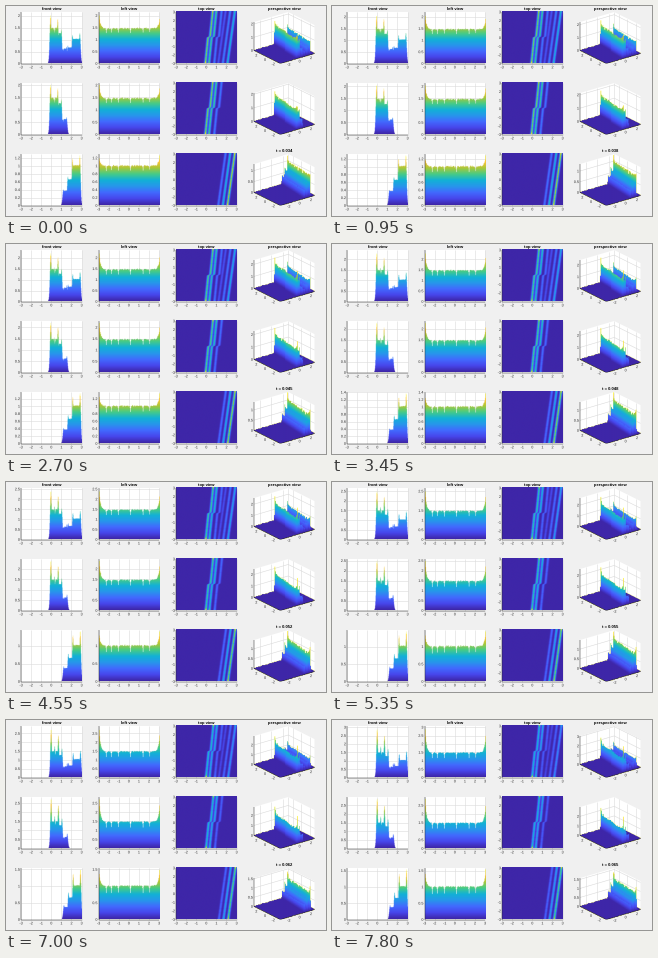
Write a matplotlib script that moves like this. It is 320 px wide and 210 px high and loops after 8 s.

```python
import numpy as np
import matplotlib.pyplot as plt
from matplotlib.animation import FuncAnimation
from matplotlib.collections import LineCollection
from matplotlib.colors import LinearSegmentedColormap
from matplotlib.patches import PathPatch, Polygon
from matplotlib.path import Path
from matplotlib.textpath import TextPath

W, H, DPI = 320, 210, 100
COLS = [15, 92.5, 170, 248]
ROWS = [6, 77, 148]
PW, PH = 60.5, 51.5
FRAMES, LAST = 160, 153
INK, GRID = "#262626", "#dadada"

parula = LinearSegmentedColormap.from_list("parula", [
    "#3e26a8", "#4746eb", "#4269fe", "#2796eb", "#12b1d6",
    "#47cb86", "#abc739", "#fec338", "#f9fb15"])

plt.rcParams["font.family"] = "Liberation Sans"
fig = plt.figure(figsize=(W / DPI, H / DPI), dpi=DPI, facecolor="#f0f0f0")
ax = fig.add_axes([0, 0, 1, 1])
ax.set(xlim=(0, W), ylim=(H, 0))
ax.axis("off")

# ---- wave field -------------------------------------------------------
xs = np.linspace(-3, 3, 241)
ys = np.linspace(-3, 3, 121)
rng = np.random.default_rng(4)
ripple = 1 - 0.035 * rng.random(ys.size)
DIPS = [-2.3, -1.8, -1.1, 0.1, 1.35, 2.0]
notch = sum(np.exp(-((ys - d) / 0.045) ** 2) for d in DIPS)


def ridges(lines, jump, low, high, p):
    """Slanted narrow ridges; each line is (centre, height, edge gain)."""
    slope = 0.12 - jump / 3
    path = slope * ys + jump * np.tanh(ys / 0.05) + 0.07 * p
    edge = low * np.exp(-(ys + 3) / 0.13) + high * np.exp(-(3 - ys) / 0.13)
    body = ripple * (1 - (0.12 + 0.1 * p) * notch)
    field = np.zeros((ys.size, xs.size))
    for centre, height, gain in lines:
        d = (xs[None] - centre - path[:, None]) / 0.11
        field += (height * (body + gain * edge))[:, None] * np.exp(-d * d)
    return field


def fields(p):
    z1 = 2.15 + 0.4 * p + 0.52 * p * p
    z2 = 0.97 * z1
    z3 = 1.30 + 0.2 * p + 0.08 * p * p
    ea = 0.94 * z1 / 1.47 - 1
    eb = 0.96 * z3 - 1
    a = ridges([(0.26, 1.47, 1), (0.61, 1.25, 0.5), (1.13, 0.6, 0.5)],
               0.1, ea, 0.7 * ea, p)
    b = ridges([(1.53, 0.36, 0.5), (1.98, 0.65, 0.7), (2.44, 1.01, 1)],
               0.0, 0.75 * eb, eb, p)
    return [(a + b, z1), (a, z2), (b, z3)]


# ---- perspective view -------------------------------------------------
CA, SA, SE, CE = 0.793, 0.609, 0.5, 0.866
SX, SY = PW / (CA + SA), PH / (SE * (CA + SA) + CE)
BASE = SE * (CA + SA) / 2


def project(x, y, z, row):
    sx = CA * x - SA * y
    sy = SE * (SA * x + CA * y) + CE * z
    return (COLS[3] + PW / 2 + SX * sx, ROWS[row] + PH - SY * (sy + BASE))


def make_rays(nw=92, nh=78, steps=90):
    px = (np.arange(nw) + 0.5) / nw * PW
    py = (np.arange(nh) + 0.5) / nh * PH
    sx = ((px - PW / 2) / SX)[None, :, None]
    sy = ((PH - py) / SY - BASE)[:, None, None]
    d = np.linspace(-0.702, 0.702, steps)[None, None]
    x, y = CA * sx + SA * d, CA * d - SA * sx
    z = (sy - SE * d) / CE + 0 * x
    inside = (abs(x) <= 0.505) & (abs(y) <= 0.505) & (z > -0.03)
    z = np.where(inside, np.maximum(z, 0), 9)
    i = np.clip(np.rint((y + 0.5) * (ys.size - 1)), 0, ys.size - 1)
    j = np.clip(np.rint((x + 0.5) * (xs.size - 1)), 0, xs.size - 1)
    idx = np.broadcast_to((i * xs.size + j).astype(np.int32), z.shape)
    shape = (nh * nw, steps)
    return idx.reshape(shape), z.reshape(shape).astype(np.float32), (nh, nw)


ray_idx, ray_z, ray_shape = make_rays()
ray_no = np.arange(len(ray_z))


def relief(u, zlim):
    hit = (u / zlim).astype(np.float32).ravel()[ray_idx] >= ray_z
    first = hit.argmax(axis=1)
    z = ray_z[ray_no, first]
    rgba = parula(z * zlim / u.max())
    rgba[:, 3] = hit[ray_no, first]
    return rgba.reshape(*ray_shape, 4)


def silhouette(env, zlim, top):
    z = np.linspace(zlim, 0, 104)
    rgba = np.repeat(parula(z / top)[:, None], env.size, axis=1)
    rgba[..., 3] = (z[:, None] <= env) & (env > 0.012)
    return rgba


# ---- text and lines ---------------------------------------------------
glyphs = {}


def label(s, x, y, align=0.5, size=3.7):
    """Small text centred on y; align 0 left, 0.5 centre, 1 right."""
    if s not in glyphs:
        glyphs[s] = TextPath((0, 0), s, size=size)
    path = glyphs[s]
    v = path.vertices.copy()
    v[:, 0] += x - align * v[:, 0].max()
    v[:, 1] = y + 1.3 - v[:, 1]
    return v, path.codes


def join(labels):
    return Path(np.concatenate([v for v, _ in labels]),
                np.concatenate([c for _, c in labels]))


def text_patch(labels):
    return ax.add_patch(PathPatch(join(labels), fc=INK, lw=0, zorder=5))


def add_lines(segs, color, lw, z):
    return ax.add_collection(LineCollection(segs, colors=color,
                                            linewidths=lw, zorder=z))


def ticks(zlim, step):
    return np.arange(0, zlim + 1e-6, step)


def z_parts(row, zlim):
    """Height grid lines and labels, which move as the limit grows."""
    segs, labels = [], []
    bottom = ROWS[row] + PH
    fine = 0.2 if row == 2 and zlim < 1.42 else 0.5
    for v in ticks(zlim, fine):
        y = bottom - v / zlim * PH
        for x in COLS[:2]:
            segs.append([(x, y), (x + PW, y)])
            labels.append(label(f"{v:.1f}".replace(".0", ""), x - 1.2, y, 1))
    for v in ticks(zlim, 0.5 if row == 2 else 1):
        k = v / zlim
        line = [project(*c, k, row) for c in [(-.5, .5), (.5, .5), (.5, -.5)]]
        segs.append(line)
        x, y = line[0]
        labels.append(label(f"{v:.1f}".replace(".0", ""), x - 1.2, y, 1))
    return segs, labels


# ---- static parts -----------------------------------------------------
grid, axes_lines, fixed = [], [], []
for r, y0 in enumerate(ROWS):
    y1 = y0 + PH
    for c, x0 in enumerate(COLS[:3]):
        ax.add_patch(plt.Rectangle((x0, y0), PW, PH, fc="white", lw=0))
        axes_lines.append([(x0, y0), (x0, y1), (x0 + PW, y1)])
        for v in range(-3, 4):
            x = x0 + (v + 3) / 6 * PW
            grid.append([(x, y0), (x, y1)])
            fixed.append(label(str(v), x, y1 + 3.6))
            if c == 2:
                fixed.append(label(str(v), x0 - 1.2, y1 - (v + 3) / 6 * PH, 1))
    left, back, right, front = (-.5, .5), (.5, .5), (.5, -.5), (-.5, -.5)
    hull = [project(*c, z, r) for c, z in
            [(left, 0), (front, 0), (right, 0), (right, 1), (back, 1), (left, 1)]]
    ax.add_patch(Polygon(hull, fc="white", lw=0))
    axes_lines.append([hull[5]] + hull[:3])
    for v in (-2, 0, 2):
        k = v / 6
        for a, b in ((k, .5), (.5, k)):
            grid.append([project(a, b, 0, r), project(a, b, 1, r)])
        x, y = project(k, -.5, 0, r)
        fixed.append(label(str(v), x + 1.2, y + 2.6, 0))
        x, y = project(-.5, k, 0, r)
        fixed.append(label(str(v), x - 1.2, y + 2.6, 1))
    grid.append([project(*back, 0, r), project(*back, 1, r)])

add_lines(grid, GRID, 0.4, 2)
add_lines(axes_lines, INK, 0.35, 4)
text_patch(fixed)


def title(s, col, y):
    return ax.text(COLS[col] + PW / 2, y, s, ha="center", va="baseline",
                   fontsize=4.15 * 72 / DPI, fontweight="bold", color="black")


for c, s in enumerate(["front view", "left view", "top view",
                       "perspective view"]):
    title(s, c, ROWS[0] - 1.7)
clock = title("", 3, ROWS[2] - 1.7)

# ---- moving parts -----------------------------------------------------
images = [[ax.imshow(np.zeros((2, 2, 4)), extent=(x, x + PW, y + PH, y),
                     aspect="auto", zorder=3) for x in COLS] for y in ROWS]
z_grid = add_lines([], GRID, 0.4, 2)
z_text = text_patch([label("0", 0, 0)])


def step_of(n):
    # a short hold at 4.05 s and another at the end
    return min(n if n <= 81 else max(81, n - 3), LAST)


def draw(n):
    k = step_of(n)
    segs, labels = [], []
    for r, (u, zlim) in enumerate(fields(k / LAST)):
        top = u.max()
        views = (silhouette(u.max(axis=0), zlim, top),
                 silhouette(u.max(axis=1), zlim, top),
                 parula(u[::-1] / top),
                 relief(u, zlim))
        for im, data in zip(images[r], views):
            im.set_data(data)
        s, t = z_parts(r, zlim)
        segs += s
        labels += t
    z_grid.set_segments(segs)
    z_text.set_path(join(labels))
    clock.set_text(f"t = {0.0342 + 0.0002 * k:.3f}")
    return []


anim = FuncAnimation(fig, draw, frames=FRAMES, interval=50, repeat=True,
                     repeat_delay=0, init_func=lambda: draw(0))
plt.show()
```
